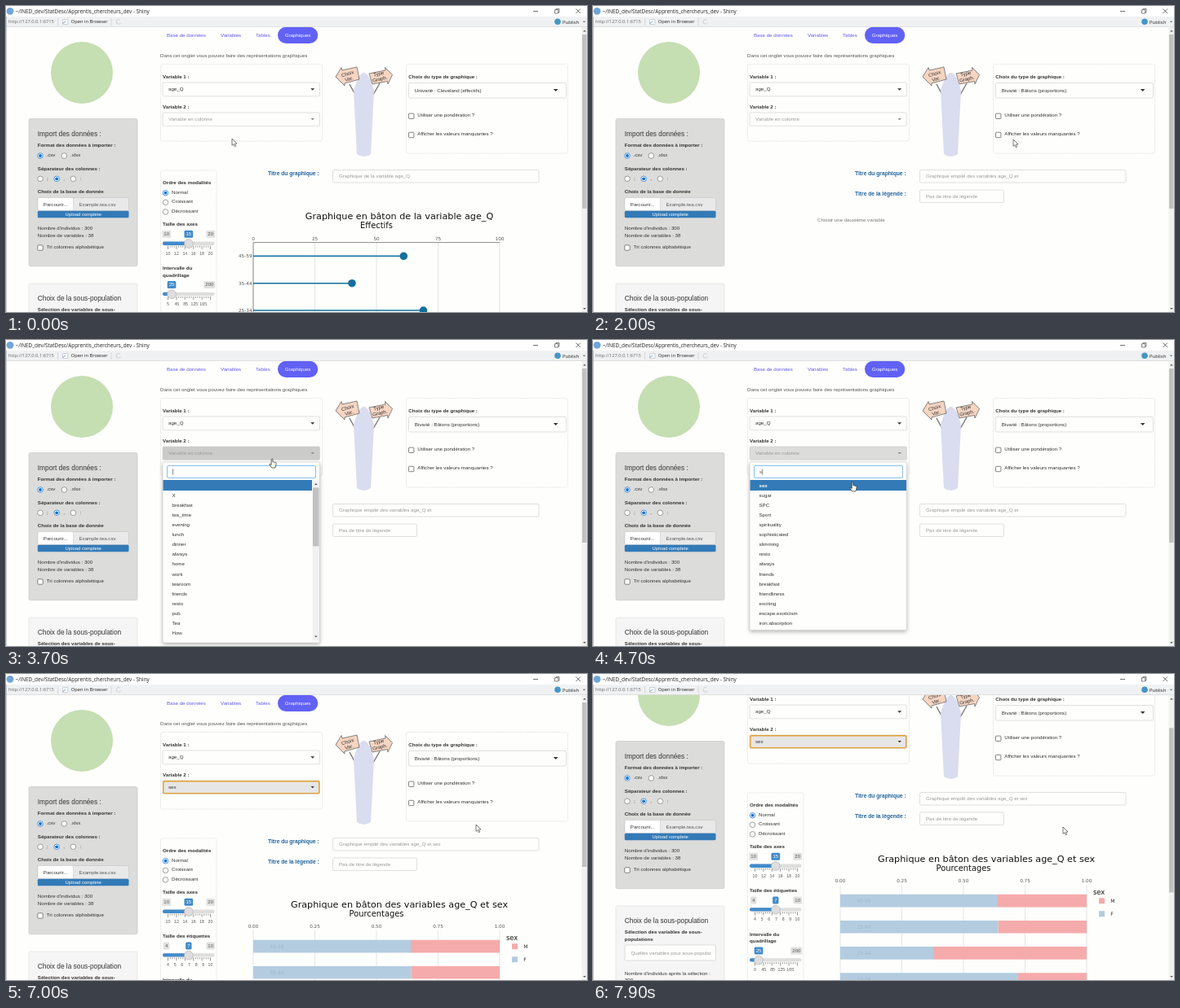
Animation of 712x376 px, one loop 8 s. Source, as an HTML page with a canvas:

```html
<!DOCTYPE html>
<html lang="fr">
<head>
<meta charset="utf-8">
<title>Graphiques</title>
<style>
html, body { margin: 0; width: 100%; height: 100%; overflow: hidden; background: #fff; }
canvas { display: block; width: 712px; height: 376px; }
</style>
</head>
<body>
<canvas id="stage"></canvas>
<script>
const W = 712, H = 376, LOOP = 8000, STEP = 100;
const SANS = '"Liberation Sans", Arial, sans-serif';
const UI = '"Open Sans", sans-serif';
const PLOT = '"DejaVu Sans", Verdana, sans-serif';
const PAPER = '#fefefc', BLUE = '#337ab7', INK = '#333', MUTED = '#999', BODY = 6.15;

const canvas = document.getElementById('stage');
const ratio = window.devicePixelRatio || 1;
canvas.width = W * ratio;
canvas.height = H * ratio;
const ctx = canvas.getContext('2d');
ctx.scale(ratio, ratio);

// Times of the hard changes, in ms
const AT = {
  typeOpen: 800, typePicked: 1800, bivariate: 2000, listOpen: 3400,
  keyS: 4300, keyE: 4900, keyX: 5100, picked: 5900, plotted: 6300, scroll: 7150
};

// [time, x, y, shape]
const POINTER = [
  [0, 277, 163, 'arrow'], [100, 277, 163, 'arrow'], [700, 512, 112, 'beam'],
  [1100, 512, 112, 'beam'], [1500, 530, 165, 'hand'], [1800, 524, 166, 'arrow'],
  [2000, 515, 164, 'arrow'], [2200, 515, 164, 'arrow'], [2800, 345, 154, 'arrow'],
  [3200, 326, 146, 'hand'], [3700, 326, 146, 'hand'], [4000, 318, 175, 'hand'],
  [4900, 318, 175, 'hand'], [5500, 260, 178, 'hand'], [5900, 260, 178, 'arrow'],
  [6600, 576, 185, 'arrow'], [7700, 576, 185, 'arrow'], [7900, 576, 188, 'arrow']
];

const TYPES = ['Univarié : Cleveland (effectifs)', 'Univarié : Cleveland (proportions)',
  'Bivarié : Bâtons (effectifs)', 'Bivarié : Bâtons (proportions)'];
const COLUMNS = ['', 'X', 'breakfast', 'tea_time', 'evening', 'lunch', 'dinner', 'always', 'home',
  'work', 'tearoom', 'friends', 'resto', 'pub', 'Tea', 'How'];
const S_COLUMNS = ['sex', 'sugar', 'SPC', 'Sport', 'spirituality', 'sophisticated', 'slimming',
  'resto', 'always', 'friends', 'breakfast', 'friendliness', 'exciting', 'escape.exoticism', 'iron.absorption'];

const ease = p => p * p * (3 - 2 * p);
const ramp = (t, from, to) => ease(Math.min(1, Math.max(0, (t - from) / (to - from))));

function text(str, x, y, o = {}) {
  const size = o.size || BODY;
  ctx.font = `${o.bold ? 'bold ' : ''}${size}px ${o.font || SANS}`;
  ctx.textAlign = o.align || 'left';
  ctx.fillStyle = o.color || INK;
  ctx.fillText(str, x, y + size * 0.33);
}
const bold = (str, x, y, color = INK, size = BODY) => text(str, x, y, { bold: true, color, size });

function paint(fill, stroke, width) {
  if (fill) { ctx.fillStyle = fill; ctx.fill(); }
  if (stroke) { ctx.strokeStyle = stroke; ctx.lineWidth = width; ctx.stroke(); }
}

function box(x, y, x2, y2, fill, stroke, radius = 1.5, width = 0.6) {
  ctx.beginPath();
  ctx.roundRect(x, y, x2 - x, y2 - y, radius);
  paint(fill, stroke, width);
}

function disc(x, y, r, fill, stroke, width = 0.7) {
  ctx.beginPath();
  ctx.arc(x, y, r, 0, Math.PI * 2);
  paint(fill, stroke, width);
}

function shape(points, fill, stroke, width = 0.7) {
  ctx.beginPath();
  points.forEach(([x, y]) => ctx.lineTo(x, y));
  ctx.closePath();
  paint(fill, stroke, width);
}

function line(x, y, x2, y2, color, width = 0.7) {
  ctx.beginPath();
  ctx.moveTo(x, y);
  ctx.lineTo(x2, y2);
  paint(null, color, width);
}

function caret(x, y, color, size = 2.5, up = false) {
  const d = up ? -1 : 1;
  shape([[x - size, y - d * size / 2], [x + size, y - d * size / 2], [x, y + d * size / 2]], color);
}

function dottedCard(x, y, x2, y2) {
  ctx.setLineDash([0.8, 0.8]);
  box(x, y, x2, y2, null, '#ccc', 2);
  ctx.setLineDash([]);
}

function popup(x, y, x2, y2) {
  ctx.save();
  ctx.shadowColor = 'rgba(0,0,0,.3)';
  ctx.shadowBlur = 5 * ratio;
  ctx.shadowOffsetY = 2 * ratio;
  box(x, y, x2, y2, PAPER);
  ctx.restore();
  box(x, y, x2, y2, null, '#ccc');
}

function radio(x, y, on) {
  disc(x, y, 3.3, '#fff', on ? '#0b6fd0' : '#777');
  if (on) disc(x, y, 1.9, '#0b6fd0');
}

const checkbox = (x, y) => box(x - 3.2, y - 3.2, x + 3.2, y + 3.2, '#fff', '#666', 0.8, 0.8);

function field(x, y, x2, y2, label) {
  box(x, y, x2, y2, PAPER, '#ccc');
  ctx.save();
  ctx.beginPath();
  ctx.rect(x, y, x2 - x - 6, y2 - y);
  ctx.clip();
  text(label, x + 7.5, (y + y2) / 2, { color: MUTED });
  ctx.restore();
}

function tag(label, x, y, fill, color) {
  ctx.font = `6px ${SANS}`;
  const half = ctx.measureText(label).width / 2 + 2;
  box(x - half, y - 4.5, x + half, y + 4.5, fill);
  text(label, x, y, { size: 6, align: 'center', color });
}

function slider(y, min, value, max, knob, labels, gap) {
  if (min) tag(min, 196.7, y, '#e1e1e1', '#555');
  tag(max, max.length > 2 ? 249.3 : 250.7, y, '#e1e1e1', '#555');
  tag(value, knob, y, '#428bca', '#fff');
  box(192, y + 9.3, 255.5, y + 13.6, '#dedede', null, 2);
  box(192, y + 9.3, knob, y + 13.6, '#428bca', null, 2);
  for (let i = 0; i <= 20; i++) {
    const x = 198.5 + i * 2.6;
    line(x, y + 14.3, x, y + (i % 4 ? 16.3 : 18.5), '#555', 0.6);
  }
  disc(knob, y + 11.7, 5.4, '#dedede', '#ababab', 0.6);
  labels.forEach((l, i) => text(l, 198.5 + i * gap, y + 23.5, { size: 5.2, align: 'center', color: '#555' }));
}

function windowBars() {
  ctx.fillStyle = '#fff';
  ctx.fillRect(0, 0, W, 13);
  ctx.fillStyle = '#f0f1f2';
  ctx.fillRect(0, 13, W, 12.5);
  line(0, 25.5, W, 25.5, '#d4d7da');
  disc(5, 6.3, 4.4, '#6fa5d8');
  text('~/INED_dev/StatDesc/Apprentis_chercheurs_dev - Shiny', 11.5, 6.4, { font: UI, size: 6.39, color: '#222' });
  line(646, 6.5, 652, 6.5, '#333');
  box(674, 3.5, 678, 7.7, '#fff', '#333', 0);
  box(672.5, 4.7, 676.7, 9, '#fff', '#333', 0);
  line(698.5, 3.5, 704, 9, '#333');
  line(704, 3.5, 698.5, 9, '#333');

  text('http://127.0.0.1:6715', 3, 19.5, { font: UI, size: 5.76, color: '#666' });
  line(63.5, 15, 63.5, 24, '#ccc');
  box(69.5, 16.5, 76, 22.5, '#fff', '#a9b6c1', 0.5);
  line(69.5, 21.5, 73, 19, '#6c9cc4', 1);
  text('Open in Browser', 79.7, 19.5, { font: UI, size: 5.75, color: '#222' });
  line(129, 15, 129, 24, '#ccc');
  ctx.beginPath();
  ctx.arc(138, 19.3, 2.8, 0.4, 5.4);
  paint(null, '#d0d9e0', 1.1);
  disc(676, 19.3, 3.8, '#4596c8');
  text('Publish', 682, 19.8, { font: UI, size: 5.95, color: '#222' });
  caret(708.5, 19.5, '#444', 1.6);
}

function pageScrollbar(tall, scroll) {
  ctx.fillStyle = '#f1f1f1';
  ctx.fillRect(705.5, 26, 6.5, H - 26);
  caret(709, 30.5, '#555', 1.8, true);
  caret(709, 372, '#555', 1.8);
  const top = 35 + scroll * 0.56;
  ctx.fillStyle = '#c1c1c1';
  ctx.fillRect(706, top, 5.5, tall ? 202 : 214);
}

function sidebar() {
  box(28, 138.5, 161, 319.7, '#dcdcda', '#c6c6c4', 2);
  text('Import des données :', 38.8, 157.3, { size: 8.3 });
  bold('Format des données à importer :', 38.8, 171);
  radio(42, 184, true);
  radio(71.3, 184);
  text('.csv', 49.5, 183);
  text('.xlsx', 79, 183);
  bold('Séparateur des colonnes :', 38.8, 199.8);
  [';', ',', ':'].forEach((mark, i) => {
    radio(42 + i * 20.2, 212.3, i === 1);
    text(mark, 50 + i * 20.2, 211.5);
  });
  bold('Choix de la base de donnée', 38.8, 228);
  box(39, 235.5, 150.5, 251.5, '#e9e9e9', '#c4c4c4');
  box(39, 235.5, 82.5, 251.5, '#fff', '#ccc');
  text('Parcourir...', 45.8, 243.5);
  text('Example.tea.csv', 89.5, 243.5, { color: '#555' });
  box(38.8, 251.7, 150.5, 260.2, BLUE);
  text('Upload complete', 94.7, 255.9, { align: 'center', color: '#fff', size: 5.9 });
  text("Nombre d'individus : 300", 38.8, 273);
  text('Nombre de variables : 38', 38.8, 281.7);
  checkbox(42, 297);
  text('Tri colonnes alphabétique', 49.8, 296);

  box(28, 341, 161, 470, '#f5f5f5', '#dcdcdc', 2);
  text('Choix de la sous-population', 38.8, 359.7, { size: 8.3 });
  bold('Sélection des variables de sous-', 38.8, 373.2);
  bold('populations', 38.8, 382);
  field(39, 389, 150.5, 408, 'Quelles variables pour sous-population');
  text("Nombre d'individus après la sélection :", 38.8, 423.5);
  text('300', 38.8, 432.3);
}

function signpost(points, words, tilt, x, y) {
  shape(points, '#f6d5c2', '#555');
  ctx.save();
  ctx.translate(x, y);
  ctx.rotate(tilt);
  words.forEach((w, i) => text(w, 0, i * 6.6 - 3.3, { size: 6.1, align: 'center' }));
  ctx.restore();
}

function mascot() {
  line(421, 96, 428, 109, '#777', 1.4);
  line(458, 95, 450, 109, '#777', 1.4);
  ctx.beginPath();
  ctx.moveTo(426, 104);
  ctx.quadraticCurveTo(438.5, 60, 451, 104);
  ctx.lineTo(447, 182);
  ctx.quadraticCurveTo(438.5, 188, 430, 182);
  ctx.closePath();
  paint('#dadcef');
  signpost([[404, 87], [411, 75.5], [412, 79], [430, 75], [433, 90], [415, 95], [415, 98]],
    ['Choix', 'Var.'], -0.3, 419.5, 86.5);
  signpost([[445, 83], [465, 79], [464.5, 75.5], [473.5, 84.5], [468, 96], [467.5, 92.5], [449, 96]],
    ['Type', 'Graph.'], -0.24, 457.5, 86.5);
}

function header() {
  disc(93, 82, 38, '#c5deb2');
  const violet = '#6259ee';
  text('Base de données', 197, 35.5, { color: violet });
  text('Variables', 263, 35.5, { color: violet });
  text('Tables', 306, 35.5, { color: violet });
  box(333, 25.8, 382.2, 46, '#6161f6', null, 10);
  text('Graphiques', 357.5, 35.7, { color: '#fff', align: 'center' });
  text('Dans cet onglet vous pouvez faire des représentations graphiques', 189, 61.2, { color: '#555' });
  mascot();
}

function variableCard(t) {
  dottedCard(189.5, 71.5, 387.5, 166);
  bold('Variable 1 :', 192, 87);
  box(192, 94, 384.5, 110.8, PAPER, '#ccc');
  text('age_Q', 199, 102.4);
  caret(375.7, 102.5, INK);
  bold('Variable 2 :', 192, 123.5);
  const open = t >= AT.listOpen && t < AT.picked, done = t >= AT.picked;
  const fill = done ? '#e6e6e6' : open ? (t < AT.keyS ? '#cbcbc9' : '#dcdcda') : PAPER;
  box(192, 131, 384.5, 147.3, fill, '#ccc');
  if (done) box(192.8, 131.8, 383.7, 146.6, null, '#e3a12f', 1.5, 1.4);
  text(done ? 'sex' : 'Variable en colonne', 199, 139.2, { color: done ? INK : MUTED });
  caret(375.7, 139.2, done ? INK : '#888', 2.2);
}

function typeCard(t) {
  dottedCard(490.5, 71.5, 688.5, 181);
  bold('Choix du type de graphique :', 493.3, 87);
  const open = t >= AT.typeOpen && t < AT.typePicked;
  box(493.5, 94.5, 686.5, 113, PAPER, open ? '#66afe9' : '#ccc', 1.5, open ? 1.1 : 0.6);
  text(TYPES[t < AT.typePicked ? 0 : 3], 500.7, 104);
  if (open) line(583.2, 100.5, 583.2, 107.5, INK, 0.6);
  caret(673.7, 103.5, INK, 2.8, open);
  checkbox(496.7, 135.3);
  text('Utiliser une pondération ?', 504.3, 133.7);
  checkbox(496.7, 158.5);
  text('Afficher les valeurs manquantes ?', 504.3, 157.3);
}

function typeMenu(t) {
  const { y } = pointerAt(t);
  const hover = Math.max(0, Math.min(3, Math.floor((y - 118) / 14.4)));
  popup(493.5, 116.5, 686.5, 179.5);
  TYPES.forEach((label, i) => {
    const mid = 125.5 + i * 14.4;
    if (i === hover) box(494, mid - 7.2, 686, mid + 7.2, '#f3f3f3', null, 0);
    text(label, 500.7, mid);
  });
}

function columnMenu(t) {
  const typed = t < AT.keyS ? '' : t < AT.keyE ? 's' : t < AT.keyX ? 'se' : 'sex';
  const items = !typed ? COLUMNS : typed === 's' ? S_COLUMNS : ['sex'];
  popup(192, 150, 384.5, typed ? 187 + (items.length - 1) * 12.1 : 372);
  box(197.5, 154.5, 379.5, 169.5, '#fff', '#85bfee', 1.5, 1);
  text(typed, 204, 162, { color: '#555' });
  if (items.length > 1) {
    const x = typed ? 207.7 : 204.5;
    line(x, 158.5, x, 165.5, INK, 0.6);
  }
  box(192.5, 172, typed ? 384 : 375, 185, BLUE, null, 0);
  items.forEach((label, i) =>
    text(label, 203.5, 178.6 + i * 12.1, { color: i ? INK : '#fff', bold: !i }));
  if (typed) return;
  ctx.fillStyle = '#f1f1f1';
  ctx.fillRect(375.5, 172.5, 8.5, 197);
  ctx.fillStyle = '#c1c1c1';
  ctx.fillRect(376, 181.5, 7.5, 72);
  caret(379.8, 177, '#555', 1.8, true);
  caret(379.8, 364.5, '#555', 1.8);
}

function plotOptions(bivariate) {
  dottedCard(189.5, 202, 258, 470);
  bold('Ordre des modalités', 192, 217);
  ['Normal', 'Croissant', 'Décroissant'].forEach((label, i) => {
    radio(195.5, 229.7 + i * 11.6, !i);
    text(label, 203, 228.6 + i * 11.6);
  });
  bold('Taille des axes', 192, 268.4);
  slider(280.3, '10', '15', '20', 223.8, ['10', '12', '14', '16', '18', '20'], 10.4);
  let y = 322;
  if (bivariate) {
    bold('Taille des étiquettes', 192, y);
    slider(334, '4', '7', '10', 223.8, ['4', '5', '6', '7', '8', '9', '10'], 8.65);
    y = 375.5;
  }
  bold('Intervalle du', 192, y);
  bold('quadrillage', 192, y + 8.7);
  slider(y + 20.5, '', '25', '200', 203, [bivariate ? '0' : '5', '45', '85', '125', '165'], 10.8);
}

function plotFields(t) {
  const label = '#1f639c', bivariate = t >= AT.bivariate;
  bold('Titre du graphique :', 321, 206, label, 6.7);
  const title = !bivariate ? 'Graphique de la variable age_Q'
    : 'Graphique empilé des variables age_Q et' + (t >= AT.picked + 200 ? ' sex' : '');
  field(400.5, 201.5, 653, 217, title);
  if (!bivariate) return;
  bold('Titre de la légende :', 321, 230.7, label, 6.7);
  field(400.5, 226, 503.5, 241.5, 'Pas de titre de légende');
}

function plotFrame(title, sub, y, axisY, ticks, axisTop) {
  text(title, 482, y, { font: PLOT, size: 11.2, align: 'center', color: '#111' });
  text(sub, 454, y + 11.2, { font: PLOT, size: 9.9, align: 'center', color: '#111' });
  ticks.forEach((tick, i) => {
    const x = 303 + i * 75.5;
    text(tick, x, axisY, { font: PLOT, size: 5.7, align: 'center', color: '#555' });
    line(x, axisTop, x, 470, '#d2d6d8', 0.6);
  });
}

function lollipops() {
  plotFrame('Graphique en bâton de la variable age_Q', 'Effectifs', 258.3, 285.8,
    ['0', '25', '50', '75', '100'], 290.5);
  line(303, 290.5, 605, 290.5, '#777', 0.8);
  line(303, 290.5, 303, H, '#777', 0.8);
  [['45-59', 487.3], ['35-44', 424], ['25-34', 511.5]].forEach(([age, x], i) => {
    const y = 307.3 + i * 33.4;
    text(age, 301.5, y, { font: PLOT, size: 5.7, align: 'right', color: '#555' });
    line(303, y, x, y, '#146f9c', 1.5);
    disc(x, y, 4.8, '#146f9c');
  });
}

function stackedBars() {
  plotFrame('Graphique en bâton des variables age_Q et sex', 'Pourcentages', 283.3, 310.3,
    ['0.00', '0.25', '0.50', '0.75', '1.00'], 315);
  const blue = '#b3cce0', pink = '#f5abab';
  [['45-59', 496], ['35-44', 496.5], ['25-34', 417], ['15-24', 521]].forEach(([age, split], i) => {
    const y = 326.7 + i * 32.2;
    box(303, y, split, y + 15.7, blue, null, 0);
    box(split, y, 605, y + 15.7, pink, null, 0);
    text(age, 332, y + 8, { font: PLOT, size: 5.9, align: 'center', color: '#a3b7c7' });
  });
  text('sex', 613, 323.8, { font: PLOT, size: 8.3, color: '#111' });
  [['M', pink], ['F', blue]].forEach(([name, color], i) => {
    const y = 334.8 + i * 16;
    box(620, y - 3.5, 627, y + 3.5, color, null, 0);
    text(name, 634.3, y, { font: PLOT, size: 6, color: '#222' });
  });
}

function pointerAt(t) {
  let i = POINTER.length - 1;
  while (i > 0 && POINTER[i][0] > t) i--;
  const a = POINTER[i], b = POINTER[i + 1] || a;
  const p = a === b ? 0 : ramp(t, a[0], b[0]);
  return { x: a[1] + (b[1] - a[1]) * p, y: a[2] + (b[2] - a[2]) * p, kind: a[3] };
}

function drawPointer(t) {
  const { x, y, kind } = pointerAt(t);
  ctx.save();
  ctx.translate(x, y);
  if (kind === 'beam') {
    line(0, -4.5, 0, 4.5, '#111', 0.9);
    line(-2, -4.5, 2, -4.5, '#111');
    line(-2, 4.5, 2, 4.5, '#111');
  } else if (kind === 'hand') {
    shape([[-0.8, 0.5], [0, -0.3], [0.9, 0.5], [0.9, 3.6], [4.6, 4.6], [5.2, 5.6], [4.6, 9], [3.8, 11],
      [-0.4, 11], [-3.2, 7], [-2.6, 6.2], [-0.8, 7.4]], '#fff', '#222', 0.7);
  } else {
    shape([[0, 0], [0, 8.4], [1.9, 6.7], [3.3, 9.8], [4.7, 9.1], [3.4, 6.2], [6, 6]], '#fff', '#444', 0.7);
  }
  ctx.restore();
}

function draw(t) {
  const univariate = t < AT.bivariate, plotted = t >= AT.plotted;
  const scroll = 56 * ramp(t, AT.scroll, AT.scroll + 250);
  ctx.fillStyle = PAPER;
  ctx.fillRect(0, 0, W, H);

  ctx.save();
  ctx.beginPath();
  ctx.rect(0, 25.5, 705.5, H - 25.5);
  ctx.clip();
  ctx.translate(0, -scroll);
  header();
  sidebar();
  variableCard(t);
  typeCard(t);
  plotFields(t);
  if (univariate || plotted) plotOptions(plotted);
  if (univariate) lollipops();
  else if (plotted) stackedBars();
  else if (t < AT.picked) text('Choisir une deuxième variable', 275, 263, { color: '#777' });
  if (t >= AT.typeOpen && t < AT.typePicked) typeMenu(t);
  if (t >= AT.listOpen && t < AT.picked) columnMenu(t);
  ctx.restore();

  windowBars();
  pageScrollbar(plotted, scroll);
  line(0.3, 13, 0.3, H, '#8b95a5', 0.6);
  drawPointer(t);
}

const start = performance.now();
function tick() {
  const t = (performance.now() - start) % LOOP;
  draw(Math.floor(t / STEP) * STEP);
  requestAnimationFrame(tick);
}
tick();
</script>
</body>
</html>
```
